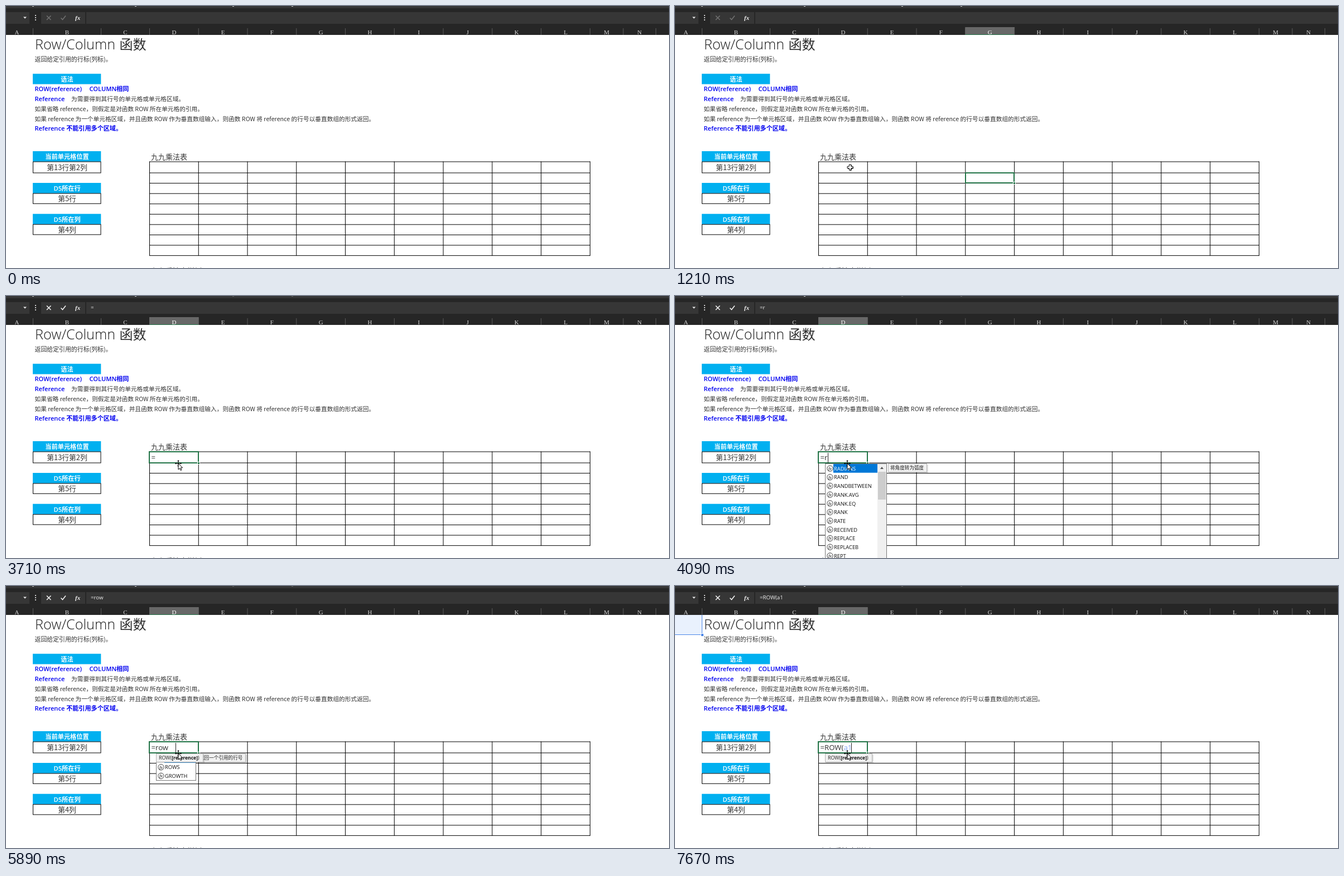
These frames come from a looping animation (1189x471 px, 8 s). An HTML page with a canvas:

```html
<!DOCTYPE html>
<html lang="zh-CN">
<head>
<meta charset="utf-8">
<title>Row/Column 函数</title>
<style>
html, body { margin: 0; width: 100%; height: 100%; overflow: hidden; background: #fff; }
canvas { display: block; width: 1189px; height: 471px; }
</style>
</head>
<body>
<canvas id="stage" width="1189" height="471"></canvas>
<script>
const ctx = document.getElementById('stage').getContext('2d');
const LOOP = 8000;
const UI = '"Open Sans", "Noto Sans CJK SC", sans-serif';
const HAN = '"Noto Sans CJK SC", "Noto Sans CJK", sans-serif';
const SERIF = '"Liberation Serif", serif';
const GREEN = '#217346', INK = '#333', BLUE = '#0000f0';

const colX = i => 257 + 87.77 * i;
const rowY = i => i ? 299.5 + 18.58 * (i - 1) : 279.5;

function rect(x, y, w, h, color) {
  ctx.fillStyle = color;
  ctx.fillRect(x, y, w, h);
}

function frame(x, y, w, h, color, fill) {
  if (fill) rect(x, y, w, h, fill);
  ctx.strokeStyle = color;
  ctx.lineWidth = 1;
  ctx.strokeRect(x + .5, y + .5, w - 1, h - 1);
}

function text(s, x, y, font, color = INK, align = 'left') {
  ctx.font = font;
  ctx.fillStyle = color;
  ctx.textAlign = align;
  ctx.fillText(s, x, y);
  return ctx.measureText(s).width;
}

function line(points, color, width) {
  ctx.beginPath();
  points.forEach(([x, y]) => ctx.lineTo(x, y));
  ctx.strokeStyle = color;
  ctx.lineWidth = width;
  ctx.stroke();
}

function shape(points, fill, stroke) {
  ctx.beginPath();
  points.forEach(([x, y]) => ctx.lineTo(x, y));
  ctx.closePath();
  ctx.fillStyle = fill;
  ctx.fill();
  if (stroke) {
    ctx.strokeStyle = stroke;
    ctx.lineWidth = 1;
    ctx.stroke();
  }
}

function drawBars(t, formula) {
  const editing = t >= 1530;
  rect(0, 0, 1189, 52, '#262626');
  rect(0, 0, 1189, 4, '#363636');
  for (const x of [47, 231, 406, 512]) {
    rect(x, 0, 3, 1, x > 400 && t >= 1680 ? '#666' : '#d0d0d0');
  }
  rect(0, 11, 42, 21, '#363636');
  rect(63, 11, 79, 21, '#363636');
  rect(144, 11, 1045, 21, '#363636');
  shape([[31, 19.5], [37, 19.5], [34, 22.8]], '#e8e8e8');
  for (const y of [17, 21, 25]) rect(52, y - 1, 2, 2, '#d0d0d0');

  const icon = editing ? '#f2f2f2' : '#707070';
  line([[73, 17.5], [80.5, 25]], icon, 1.6);
  line([[80.5, 17.5], [73, 25]], icon, 1.6);
  line([[98.5, 21.5], [101.5, 24.5], [107, 17.5]], icon, 1.6);
  text('fx', 124, 24.5, 'italic bold 11px ' + SERIF, '#f0f0f0');
  text(formula, 152, 24.3, '9.7px ' + UI, '#f0f0f0');

  const active = t >= 1300 ? 3 : t >= 400 ? 6 : -1;
  const edges = [-10, 48, 170];
  for (let i = 0; i < 10; i++) edges.push(colX(i));
  edges.push(1106.5, 1165);
  for (let i = 0; i < 14; i++) {
    const x = edges[i], w = edges[i + 1] - x, on = i === active;
    if (on) {
      rect(x, 38, w + 1, 13, '#686868');
      rect(x, 51, w + 1, 1, GREEN);
    }
    rect(edges[i + 1], 40, 1, 12, '#5c5c5c');
    text(String.fromCharCode(65 + i), x + w / 2 + .5, 50.5, '11px ' + SERIF, on ? '#fff' : '#d4d4d4', 'center');
  }
}

function drawLabel(s, y) {
  rect(48, y, 122.3, 18.7, '#00b0f0');
  text(s, 109.5, y + 13.8, '600 11.2px ' + UI, '#fff', 'center');
}

function drawBox(title, value, y, h) {
  drawLabel(title, y);
  frame(48, y + 18.5, 122.5, h, '#000');
  text(value, 109.5, y + h / 2 + 23.6, '300 12.8px ' + HAN, INK, 'center');
}

function drawSheet() {
  const body = '300 10.7px ' + HAN, bold = '600 11.1px ' + UI;
  text('Row/Column', 52, 78, '300 25.2px ' + UI, '#1c1c1c');
  text('函数', 203.5, 78, '300 24px ' + HAN, '#2c2c2c');
  text('返回给定引用的行标(列标)。', 51.5, 99.7, '300 10.9px ' + HAN);
  drawLabel('语法', 121.8);
  text('ROW(reference)', 51.5, 153, bold, BLUE);
  text('COLUMN相同', 149.5, 153, bold, BLUE);
  text('Reference', 51.5, 171, bold, BLUE);
  text('为需要得到其行号的单元格或单元格区域。', 117, 171, body);
  text('如果省略 reference，则假定是对函数 ROW 所在单元格的引用。', 51.5, 188.6, body);
  text('如果 reference 为一个单元格区域，并且函数 ROW 作为垂直数组输入，则函数 ROW 将 reference 的行号以垂直数组的形式返回。', 51.5, 206.6, body);
  text('Reference 不能引用多个区域。', 51.5, 224.2, bold, BLUE);

  drawBox('当前单元格位置', '第13行第2列', 261, 21);
  drawBox('D5所在行', '第5行', 318, 19.3);
  drawBox('D5所在列', '第4列', 373.7, 19.3);

  text('九九乘法表', 260, 275.6, '300 13px ' + HAN);
  text('九九乘法表样例', 260, 481, '300 13px ' + HAN);
  for (let i = 0; i < 10; i++) {
    rect(colX(i), 279.5, 1, 169.6, '#000');
    rect(257, rowY(i), 791, 1, '#000');
  }
}

function drawSelection(col, row) {
  const x = Math.ceil(colX(col)), y = Math.ceil(rowY(row));
  const right = Math.round(colX(col + 1)), bottom = Math.round(rowY(row + 1));
  ctx.strokeStyle = GREEN;
  ctx.lineWidth = 2;
  ctx.strokeRect(x, y, right - x, bottom - y);
  rect(right - 2, bottom - 2, 5, 5, '#fff');
  rect(right - 1, bottom - 1, 3, 3, GREEN);
}

function drawList(names, x, y, w, picked, scroll) {
  const h = names.length * 15.7 + 2;
  frame(x, y, w, Math.round(h), '#777', '#fff');
  names.forEach((name, i) => {
    const mid = y + 9 + i * 15.7, on = i === picked;
    if (on) rect(x + 15, mid - 8, w - 16 - scroll, 15.7, '#0078d7');
    ctx.beginPath();
    ctx.arc(x + 9, mid, 5.2, 0, Math.PI * 2);
    ctx.strokeStyle = '#444';
    ctx.lineWidth = 1;
    ctx.stroke();
    text('fx', x + 9, mid + 2.8, 'italic 8.5px ' + SERIF, '#111', 'center');
    text(name, x + 16, mid + 3.7, '9.3px ' + UI, on ? '#fff' : '#111');
  });
  if (scroll) {
    rect(x + w - 1 - scroll, y + 1, scroll, h - 2, '#f0f0f0');
    rect(x + w - scroll, y + 15, scroll - 2, 50, '#cdcdcd');
    const c = x + w - 1 - scroll / 2;
    shape([[c - 3, y + 10], [c + 3, y + 10], [c, y + 6]], '#555');
  }
}

function drawTip(s, x, w) {
  rect(x + 2, 303, w, 15, 'rgba(0,0,0,.12)');
  frame(x, 301, w, 16, '#b4b4b4', '#f1f1f1');
  text(s, x + 4, 311.7, '8.6px ' + HAN, '#222');
}

function drawSyntax() {
  drawTip('', 269, 85);
  let x = 274;
  x += text('ROW(', x, 311.6, '8.9px ' + UI, '#222');
  x += text('[reference]', x, 311.6, 'bold 8.6px ' + UI, '#111');
  text(')', x, 311.6, '8.9px ' + UI, '#222');
}

const R_LIST = 'RADIANS RAND RANDBETWEEN RANK.AVG RANK.EQ RANK RATE RECEIVED REPLACE REPLACEB REPT RIGHT'.split(' ');
const RO_LIST = 'ROMAN ROUND ROUNDDOWN ROUNDUP ROW ROWS'.split(' ');
const ROW_LIST = ['ROW', 'ROWS', 'GROWTH'];
const A_LIST = 'ABS ACCRINT ACCRINTM ACOS ACOSH ACOT ACOTH ADDRESS AGGREGATE AMORDEGRC AMORLINC AND'.split(' ');

function drawHelp(t) {
  if (t >= 4090 && t < 4350) {
    drawList(R_LIST, 269, 301, 111, 0, 16);
    drawTip('将角度转为弧度', 382, 70);
  } else if (t >= 4350 && t < 5580) {
    drawList(RO_LIST, 269, 301, 95, 0, 0);
    drawTip('将阿拉伯数字转换成文本式罗马数字', 366, 146);
  } else if (t >= 5580 && t < 5970) {
    drawList(ROW_LIST, 269, 301, 72, 0, 0);
    drawTip('返回一个引用的行号', 343, 87);
  }
  if (t >= 7120 && t < 7530) drawList(A_LIST, 303, 317, 102, -1, 16);
  if (t >= 5890) drawSyntax();
}

// time, formula, caret x
const typed = [
  [0, '', 260], [3090, '=', 269], [4090, '=r', 274], [4260, '=ro', 282],
  [5580, '=row', 291], [5890, '=row', 304], [5970, '=ROW(', 304],
  [7120, '=ROW(a', 311], [7530, '=ROW(a1', 316]
];
// time, caret opacity
const blinks = [
  [0, 0], [1990, .35], [2070, 1], [2540, .5], [2610, 0], [3010, .5], [3090, 1],
  [3580, .6], [3650, .3], [3710, 0], [4090, 1], [4730, .5], [4810, 0],
  [5280, .5], [5350, 1], [6350, .5], [6450, 0], [6890, .5], [6970, 1]
];
const latest = (list, t) => list.reduce((a, b) => b[0] <= t ? b : a);

function drawEntry(t, formula, caret) {
  const font = '13.2px ' + UI;
  const [head, ref] = formula.split('(');
  const w = text(ref === undefined ? head : head + '(', 260.5, 295, font);
  if (ref) text(ref, 260.5 + w, 295, font, t >= 7530 ? '#86a8f2' : INK);
  ctx.globalAlpha = latest(blinks, t)[1];
  rect(caret, 282, 1, 18, '#222');
  ctx.globalAlpha = 1;
}

function drawReference() {
  rect(0, 52, 48, 35, '#e9f1fd');
  rect(48, 52, 1, 36, '#4a86e8');
  rect(0, 87, 49, 1, '#4a86e8');
  rect(46, 85, 5, 5, '#fff');
  rect(47, 86, 4, 4, '#4a86e8');
}

const path = [
  [70, 830, 447], [400, 565, 311], [680, 343, 322], [830, 343, 322],
  [1150, 314, 290], [1530, 315, 290], [1990, 315, 290],
  [2150, 311, 260], [2380, 309, 301]
];

function pointer(t) {
  const i = path.findIndex(p => p[0] > t);
  if (i < 0) return path[path.length - 1].slice(1);
  const [t0, x0, y0] = path[i - 1], [t1, x1, y1] = path[i];
  let k = (t - t0) / (t1 - t0);
  k = k * k * (3 - 2 * k);
  return [x0 + (x1 - x0) * k, y0 + (y1 - y0) * k];
}

function drawPlus() {
  const a = 1.7, b = 5;
  const cross = [[-a, -b], [a, -b], [a, -a], [b, -a], [b, a], [a, a],
    [a, b], [-a, b], [-a, a], [-b, a], [-b, -a], [-a, -a]];
  shape(cross.map(([x, y]) => [x + .8, y + .8]), '#000');
  shape(cross, '#fff', '#000');
}

function drawBeam() {
  rect(-.5, -5.5, 1.2, 11, '#000');
  for (const y of [-6, 5]) rect(-2.5, y, 5, 1, '#000');
}

function drawMove() {
  for (let i = 0; i < 4; i++) {
    line([[0, 0], [0, -4]], '#000', 1);
    shape([[-1.8, -3.8], [1.8, -3.8], [0, -6.2]], '#000');
    ctx.rotate(Math.PI / 2);
  }
  shape([[0, 0], [0, 11], [2.5, 8.7], [4.2, 12.5], [6, 11.7], [4.3, 8], [7.6, 7.7]], '#fff', '#000');
}

function drawPointer(t) {
  if (t < 70) return;
  const [x, y] = pointer(t);
  ctx.save();
  ctx.translate(x, y);
  if (t < 1530 || y < 279) drawPlus();
  else if (y > 297) drawMove();
  else drawBeam();
  ctx.restore();
}

function draw(t) {
  const [, formula, caret] = latest(typed, t);
  rect(0, 0, 1189, 471, '#fff');
  drawBars(t, formula);
  if (t >= 7600) drawReference();
  drawSheet();
  if (t >= 1300) drawSelection(0, 0);
  else if (t >= 400) drawSelection(3, 1);
  if (t >= 1530) drawEntry(t, formula, caret);
  drawHelp(t);
  drawPointer(t);
}

const start = performance.now();
function tick() {
  draw((performance.now() - start) % LOOP);
  requestAnimationFrame(tick);
}
tick();
</script>
</body>
</html>
```
